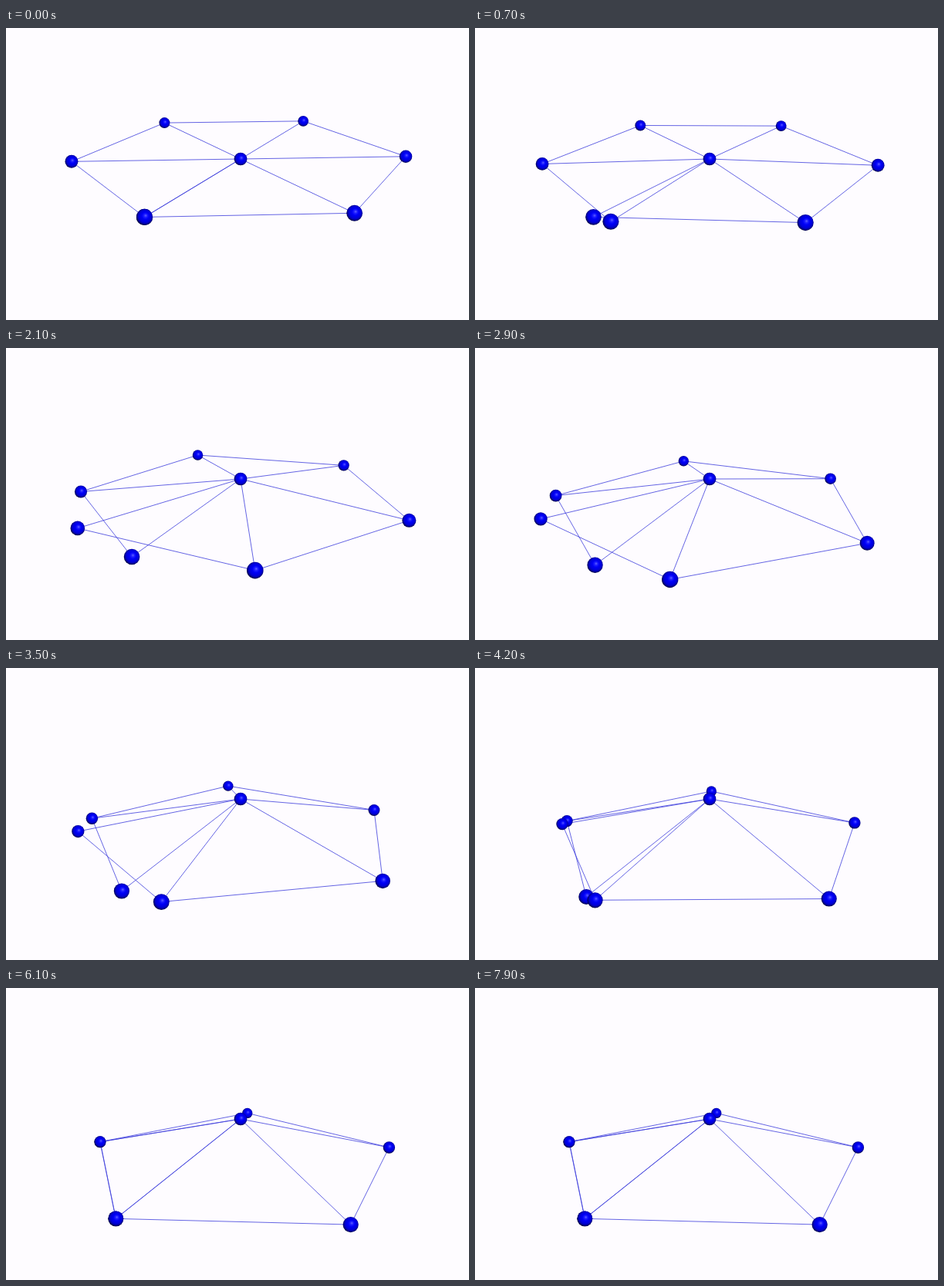
These frames come from a looping animation (600 by 379 pixels, 8000 ms). An HTML page with a canvas:

```html
<!DOCTYPE html>
<html lang="en">
<head>
<meta charset="utf-8">
<title>Folding hexagon</title>
<style>
  html, body { margin: 0; width: 100%; height: 100%; overflow: hidden; background: #fefcff; }
  canvas { display: block; }
</style>
</head>
<body>
<canvas id="stage" width="600" height="379"></canvas>
<script>
const ctx = document.getElementById('stage').getContext('2d');

const LOOP = 8000;
const STEP = { start: 67, length: 213, count: 20 };
const CAMERA = { focal: 864, distance: 3.985, sin: 0.33, cos: 0.944, x: 300, y: 189.5 };
const APEX = { x: 0.0185, y: -0.0899 };
const BALL_SIZE = 33.3;
const START_ANGLE = 57.2;

// x points right, y towards the viewer, z up, all relative to the apex.
function project(x, y, z) {
  const depth = CAMERA.distance - y * CAMERA.cos - z * CAMERA.sin;
  const scale = CAMERA.focal / depth;
  return {
    x: CAMERA.x + scale * (APEX.x + x),
    y: CAMERA.y + scale * (APEX.y + y * CAMERA.sin - z * CAMERA.cos),
    r: BALL_SIZE / depth,
    depth
  };
}

// The sector angle widens from 60 to 72 degrees while the rim sinks.
function rimPoints(fold) {
  const sector = 60 / (1 - fold);
  const radius = 1 - fold / 40;
  const drop = 1.6 * fold + 0.35 * fold * fold;
  return Array.from({ length: 7 }, (_, i) => {
    const angle = (START_ANGLE + (i + 1) * sector) * Math.PI / 180;
    return project(radius * Math.cos(angle), radius * Math.sin(angle), -drop);
  });
}

// A single path keeps coinciding edges from darkening each other.
function edges(apex, rim) {
  ctx.beginPath();
  rim.forEach((p, i) => {
    ctx.moveTo(apex.x, apex.y);
    ctx.lineTo(p.x, p.y);
    if (i) ctx.lineTo(rim[i - 1].x, rim[i - 1].y);
  });
  ctx.strokeStyle = '#3e3edc';
  ctx.lineWidth = 0.8;
  ctx.lineJoin = 'bevel';
  ctx.stroke();
}

function ball({ x, y, r }) {
  const shade = ctx.createRadialGradient(
    x + r * 0.15, y - r * 0.2, 0,
    x + r * 0.04, y - r * 0.06, r * 1.07);
  shade.addColorStop(0, '#6060ff');
  shade.addColorStop(0.2, '#1c1cff');
  shade.addColorStop(0.4, '#0000f6');
  shade.addColorStop(0.7, '#0000d8');
  shade.addColorStop(0.88, '#000090');
  shade.addColorStop(1, '#000030');
  ctx.fillStyle = shade;
  ctx.beginPath();
  ctx.arc(x, y, r, 0, Math.PI * 2);
  ctx.fill();
}

function draw(time) {
  const step = Math.floor((time - STEP.start) / STEP.length);
  const fold = Math.max(0, Math.min(STEP.count, step)) / 120;
  const apex = project(0, 0, 0);
  const rim = rimPoints(fold);

  ctx.fillStyle = '#fefcff';
  ctx.fillRect(0, 0, 600, 379);
  edges(apex, rim);
  [apex, ...rim].sort((a, b) => b.depth - a.depth).forEach(ball);
}

const begin = performance.now();
function tick() {
  draw((performance.now() - begin) % LOOP);
  requestAnimationFrame(tick);
}
tick();
</script>
</body>
</html>
```
